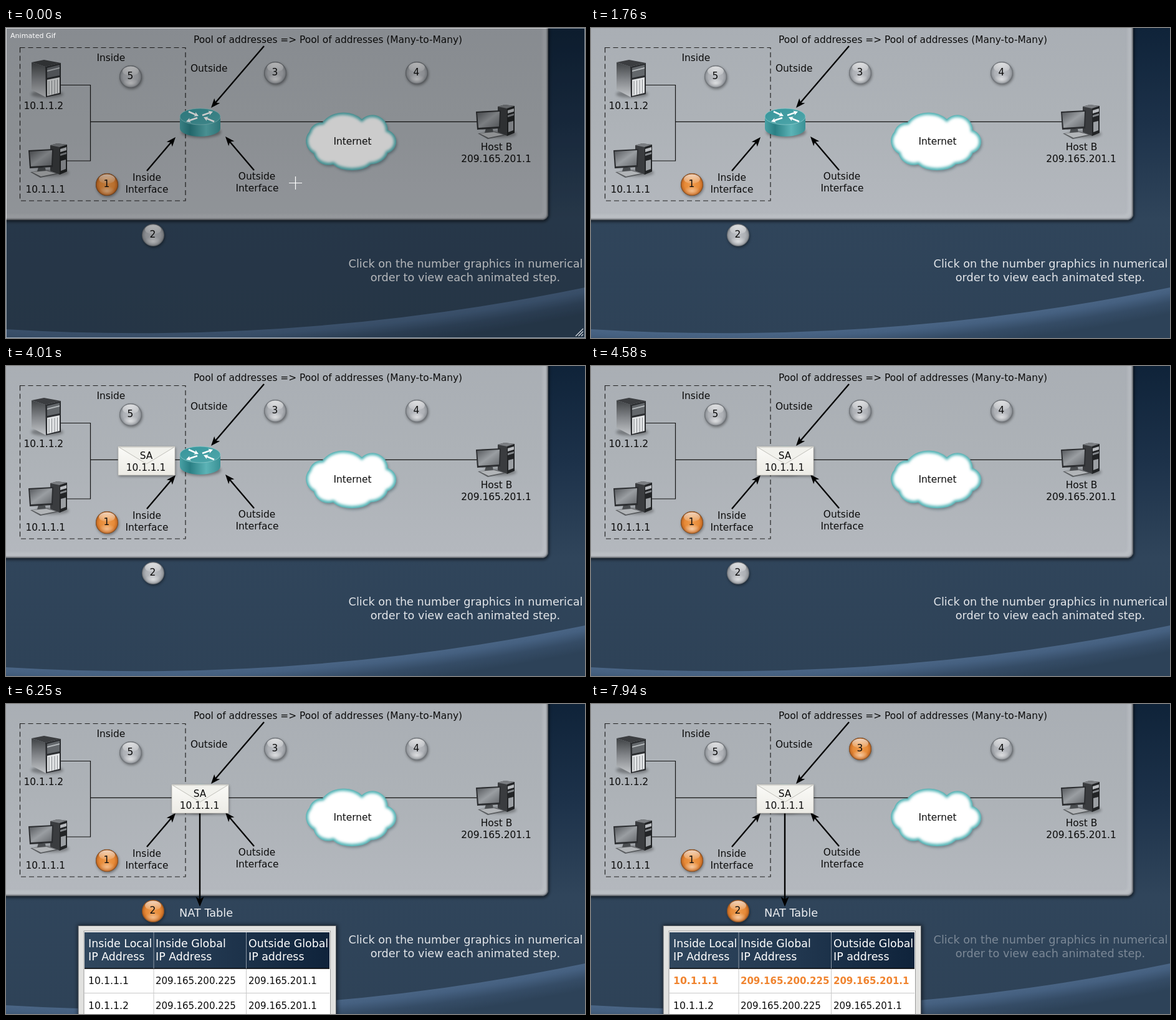
An HTML page that plays this animation: 929x497 px, repeating every 8 s.

```html
<!DOCTYPE html>
<html lang="en">
<head>
<meta charset="utf-8">
<title>NAT address pool</title>
<style>
html, body { margin: 0; width: 100%; height: 100%; overflow: hidden; background: #2f4459; }
svg { display: block; width: 929px; height: 497px; }
text { font-family: "DejaVu Sans", Verdana, sans-serif; font-size: 15.4px; fill: #0c0c0c; }
.mid { text-anchor: middle; }
.big { font-size: 17.7px; fill: #eceef1; }
.head { font-size: 17.4px; fill: #fff; }
.cell { font-size: 15px; }
.first { font-size: 15.7px; }
.hot { font-weight: bold; fill: #f0842f; }
.wire { fill: none; stroke: #151515; stroke-width: 1.2; }
</style>
</head>
<body>
<svg id="stage" viewBox="0 0 929 497" xmlns="http://www.w3.org/2000/svg"></svg>
<script>
const CLOUD = 'M508 152A40 34 0 0 1 571 147A24 24 0 0 1 612 164A20 19 0 0 1 612 200' +
  'A30 24 0 0 1 585 218A34 18 0 0 1 525 218A24 22 0 0 1 494 201A22 22 0 0 1 487 167A20 20 0 0 1 508 152Z';

const text = (x, y, s, cls = '') => `<text x="${x}" y="${y}" class="${cls}">${s}</text>`;
const mid = (x, y, s, cls = '') => text(x, y, s, 'mid ' + cls);
const poly = (points, fill, extra = '') => `<polygon points="${points}" fill="${fill}" ${extra}/>`;
const rect = (x, y, w, h, fill, extra = '') =>
  `<rect x="${x}" y="${y}" width="${w}" height="${h}" fill="${fill}" ${extra}/>`;

// stops: "offset colour [opacity]", separated by commas
const stops = list => list.split(',').map(s => {
  const [o, c, a = 1] = s.trim().split(' ');
  return `<stop offset="${o}" stop-color="${c}" stop-opacity="${a}"/>`;
}).join('');
const linear = (id, list, x2 = 0, y2 = 1) =>
  `<linearGradient id="${id}" x1="0" y1="0" x2="${x2}" y2="${y2}">${stops(list)}</linearGradient>`;
const radial = (id, list, attrs = '') => `<radialGradient id="${id}" ${attrs}>${stops(list)}</radialGradient>`;
const blur = (id, d) =>
  `<filter id="${id}" x="-30%" y="-30%" width="160%" height="160%"><feGaussianBlur stdDeviation="${d}"/></filter>`;

function arrow(x1, y1, x2, y2, color = '#000', w = 2.3, len = 15, half = 6) {
  const d = Math.hypot(x2 - x1, y2 - y1), ux = (x2 - x1) / d, uy = (y2 - y1) / d;
  const at = (back, side) => `${x2 - ux * back - uy * side},${y2 - uy * back + ux * side}`;
  return `<line x1="${x1}" y1="${y1}" x2="${x2 - ux * len * .7}" y2="${y2 - uy * len * .7}" stroke="${color}" stroke-width="${w}"/>` +
    poly([at(0, 0), at(len, half), at(len * .75, 0), at(len, -half)].join(' '), color);
}

function badge(n, x, y) {
  return `<g transform="translate(${x} ${y})">
    <circle cx="1" cy="2" r="18" fill="#000" opacity=".4" filter="url(#b2)"/>
    <circle r="18" fill="url(#grey)"/>
    <circle id="lit${n}" r="18" fill="url(#orange)"/>
    <ellipse cy="-9" rx="13" ry="7.5" fill="url(#gloss)"/>
    <ellipse id="glow${n}" cy="10" rx="13" ry="8" fill="url(#glow)"/>
    ${mid(-.5, 4, n)}</g>`;
}

function server() {
  let ribs = '';
  for (let i = 0; i < 4; i++) ribs += `<path d="M${69 + i * 4.5} ${85 - i * .8}V${107 - i * .5}" stroke="#85898d"/>`;
  return `<ellipse cx="66" cy="106" rx="26" ry="6" fill="#000" opacity=".3" filter="url(#b2)"/>` +
    poly('41,55 63,62 64,111 41,99', 'url(#side)') +
    poly('41,55 61,51 88,56 63,62', '#3b3d40') +
    poly('63,62 88,56 88,106 64,111', '#2b2d30') +
    poly('66,64 86,59 86,76 66,80', '#63676b') +
    poly('66,68 86,63 86,65 66,70', '#b4b8bb') +
    poly('66,83 86,79 86,104 66,109', '#e2e4e6') + ribs;
}

function desktop(dx, dy) {
  return `<g transform="translate(${dx} ${dy})">
    <ellipse cx="74" cy="232" rx="27" ry="6" fill="#000" opacity=".3" filter="url(#b2)"/>` +
    poly('71,188 82,185 98,187 98,230 86,235 71,229', '#3a3c3f') +
    poly('71,188 82,185 98,187 86,191', '#7b7e82') +
    poly('86,191 98,187 98,230 86,235', '#222426') +
    poly('87,194 97,191 97,196 87,199', '#b9bcc0') + poly('87,202 97,199 97,202 87,205', '#85898d') +
    poly('88,213 96,211 96,226 88,229', '#9b9fa3') +
    poly('52,223 63,224 64,230 50,230', '#4a4d50') +
    poly('36,196 76,194 75,223 38,225', '#2c2e31') +
    poly('38,198 74,196 73,220 40,222', 'url(#screen)') +
    poly('39,231 66,228 84,234 55,240', '#5a5d60') +
    poly('42,231 65,229 80,233 56,238', '#b2b5b8') +
    '</g>';
}

function router() {
  const spoke = (...p) => arrow(...p, '#fff', 2.5, 7, 3.8);
  return `<ellipse cx="313" cy="167" rx="32" ry="9" fill="#000" opacity=".35" filter="url(#b2)"/>
    <path d="M279 142V161A32.5 13 0 0 0 344 161V142Z" fill="url(#teal)"/>
    <ellipse cx="311.5" cy="142" rx="32.5" ry="13" fill="url(#tealTop)" stroke="#8cc9cb" stroke-width=".8"/>` +
    spoke(293, 134, 309, 141) + spoke(315, 140, 332, 134) +
    spoke(307, 144, 289, 150) + spoke(334, 150, 317, 143);
}

const cloud = () => `
  <path d="${CLOUD}" transform="translate(2 3)" fill="#2a4a52" opacity=".45" filter="url(#b2)"/>
  <path d="${CLOUD}" fill="#fff"/>
  <g clip-path="url(#cloudClip)"><path d="${CLOUD}" fill="none" stroke="#4fb3b5" stroke-width="6" filter="url(#b2)"/></g>
  <path d="${CLOUD}" fill="none" stroke="#62b4b6" stroke-width="1.2"/>` + mid(556, 187, 'Internet');

const envelope = () => `<g id="mail">
  ${rect(1, 2, 91, 46, '#000', 'opacity=".4" filter="url(#b2)"')}
  ${rect(0, 0, 91, 46, 'url(#paper)', 'stroke="#b9b8b2" stroke-width=".7"')}
  <path d="M1 1L45.5 28L90 1Z" fill="#f1f1ec" stroke="#c0bfb9"/>
  ${mid(45, 20, 'SA')}${mid(44.5, 39, '10.1.1.1')}</g>`;

function table() {
  const cols = [132, 240, 389];
  const row = (y, cells, cls) => cells.map((s, i) => text(cols[i], y, s, cls + (i || cls === 'head' ? '' : ' first'))).join('');
  const hit = ['10.1.1.1', '209.165.200.225', '209.165.201.1'];
  const seps = [237, 385.5].map(x =>
    `<path d="M${x} 366V424" stroke="#8c98a5"/><path d="M${x} 425V497" stroke="#c9c9c9"/>`).join('');
  return `<g id="table">${text(278, 341, 'NAT Table', 'big')}
    ${rect(115, 354, 417, 160, '#000', 'opacity=".55" filter="url(#b3)"')}
    ${rect(116, 355.5, 413.5, 160, '#e2e2e0', 'stroke="#55595e"')}
    ${rect(125, 364, 395.5, 160, '#fff', 'stroke="#9a9a9a"')}
    ${rect(126, 366, 393, 58, 'url(#navy)')}
    <path d="M126 424H519" stroke="#000" stroke-width="1.6"/>${seps}
    <path d="M126 463.5H519" stroke="#c9c9c9"/>
    ${row(390, ['Inside Local', 'Inside Global', 'Outside Global'], 'head')}
    ${row(411, ['IP Address', 'IP Address', 'IP address'], 'head')}
    <g id="hot">${row(449, hit, 'cell hot')}</g><g id="plain">${row(449, hit, 'cell')}</g>
    ${row(489, ['10.1.1.2', '209.165.200.225', '209.165.201.1'], 'cell')}</g>`;
}

const recorder = () => `<g id="recorder">
  ${rect(1, 1, 927, 495, '#000', 'opacity=".2"')}
  ${rect(.5, .5, 928, 496, 'none', 'stroke="#fff" stroke-opacity=".5"')}
  <text x="7" y="16" style="font-size:11.1px;fill:#fff">Animated Gif</text>
  <path d="M454 248.5H475M464.5 238V259" stroke="#fff" stroke-width="1.2"/>
  <path d="M914 494L926 482M918.5 494L926 486.5M923 494L926 491" stroke="#dfe3e8" stroke-width="1.1"/></g>`;

const HILL_R = 3640;
const hillStop = (depth, color) => `${(3570 + depth) / HILL_R} ${color}`;

document.getElementById('stage').innerHTML = `<defs>
  ${blur('b1', 1.2)}${blur('b2', 2)}${blur('b3', 3)}
  ${linear('sky', '0 #0f2339, .3 #1c3149, .62 #30455b, 1 #2e4257')}
  ${radial('hill', [hillStop(0, '#4a6585'), hillStop(8, '#456080'), hillStop(24, '#354c66'), hillStop(42, '#2d4258')].join(),
    `gradientUnits="userSpaceOnUse" cx="207" cy="-3081" r="${HILL_R}"`)}
  ${linear('panel', '0 #a9aeb4, .5 #adb2b7, 1 #b4b8be')}
  ${linear('side', '0 #3f4245, .45 #7d8084, 1 #c3c6c9')}
  ${linear('screen', '0 #55585c, .5 #9a9ea2, 1 #66696d', 1, 1)}
  ${linear('teal', '0 #48a0a4, .25 #2a7f84, .65 #5cb3b6, 1 #3a9195', 1, 0)}
  ${linear('tealTop', '0 #37949a, 1 #4fa7ab', 1, 1)}
  ${linear('paper', '0 #fbfbf8, 1 #ecebe5')}
  ${linear('navy', '0 #30475e, .5 #223850, 1 #0f233b', 1, 0)}
  ${radial('grey', '0 #bcbfc4, .65 #adb0b5, .88 #94989d, 1 #63676c')}
  ${radial('orange', '0 #ef9a4b, .65 #e68a38, .88 #cc7027, 1 #80481a')}
  ${linear('gloss', '0 #fff .7, 1 #fff .12')}
  ${radial('glow', '0 #fff .75, 1 #fff 0')}
  <clipPath id="cloudClip"><path d="${CLOUD}"/></clipPath>
  <clipPath id="panelClip"><rect x="-20" y="-20" width="890" height="328" rx="10"/></clipPath>
  </defs>
  ${rect(0, 0, 929, 497, 'url(#sky)')}
  <path d="M0 483A3570 3570 0 0 0 929 416V497H0Z" fill="url(#hill)"/>
  ${rect(-20, -20, 892, 331, '#000', 'rx="11" opacity=".5" filter="url(#b2)"')}
  ${rect(-20, -20, 890, 328, 'url(#panel)', 'rx="10"')}
  <g clip-path="url(#panelClip)">
    ${rect(-20, -20, 884, 322, 'none', 'rx="8" stroke="#cdd0d4" stroke-width="3" opacity=".6" filter="url(#b2)"')}
    ${rect(-20, -20, 891, 329, 'none', 'rx="10" stroke="#4a4f55" stroke-width="5" filter="url(#b1)"')}
  </g>
  ${rect(22.5, 31.5, 265.5, 245.5, 'none', 'stroke="#222" stroke-width="1.2" stroke-dasharray="8 5"')}
  <path class="wire" d="M88 91.5H135.5V213H95M135.5 150.3H758"/>
  ${server()}${desktop(0, 0)}${desktop(718, -62)}${router()}${cloud()}
  ${arrow(414, 29, 329, 128)}${arrow(226, 229, 272, 175)}${arrow(398, 228, 352, 174)}
  ${text(301, 24, 'Pool of addresses =&gt; Pool of addresses (Many-to-Many)')}
  ${text(145.5, 53, 'Inside')}${text(296, 70, 'Outside')}
  ${text(28.5, 130, '10.1.1.2')}${text(31.5, 264, '10.1.1.1')}
  ${mid(226, 245, 'Inside')}${mid(226, 263.5, 'Interface')}
  ${mid(402.5, 243, 'Outside')}${mid(403, 262, 'Interface')}
  ${mid(787, 196, 'Host B')}${mid(786.5, 215, '209.165.201.1')}
  ${badge(1, 162, 251)}${badge(2, 236, 332)}${badge(3, 432, 72)}${badge(4, 659, 72)}${badge(5, 200, 78)}
  <g id="down">${arrow(311, 175, 311, 325, '#000', 2.4, 16, 6.5)}</g>
  ${envelope()}
  <g id="hint">${mid(737.5, 384, 'Click on the number graphics in numerical', 'big')}
  ${mid(737, 406, 'order to view each animated step.', 'big')}</g>
  ${table()}${recorder()}`;

const LOOP = 8000;
const TICKS = [0, 80, 640, 1200, 1760, 2340, 2890, 3450, 4010, 4580, 5140, 5680, 6250, 6800, 7390, 7940];
const HINT = [.4, .95, .95, .55];
const GLOW = [.7, .55, .75, .45];
const ROUTE = [[26, 190], [86, 190], [96, 129], [180, 129], [266, 129]];
const FADE = [0, .22, .62, 1];
const LIT_AT = { 1: 0, 2: 5680, 3: 7940 };

const el = id => document.getElementById(id);
const show = (id, on) => el(id).setAttribute('display', on ? 'inline' : 'none');
const alpha = (id, v) => el(id).setAttribute('opacity', v);

// The picture is held between ticks.
function draw(now) {
  const t = now % LOOP;
  const step = TICKS.filter(k => k <= t).length - 1;
  const phase = (step + 1) % 4;

  show('recorder', t < 1760);
  alpha('hint', HINT[phase]);
  for (let n = 1; n <= 5; n++) {
    const on = t >= (LIT_AT[n] ?? Infinity);
    show('lit' + n, on);
    alpha('glow' + n, on ? GLOW[phase] : .75);
  }

  show('mail', step >= 5);
  const [x, y] = ROUTE[Math.min(Math.max(step - 5, 0), ROUTE.length - 1)];
  el('mail').setAttribute('transform', `translate(${x} ${y})`);

  show('down', t >= 5680);
  show('table', t >= 6250);
  const hot = FADE[Math.min(Math.max(step - 12, 0), 3)];
  alpha('hot', hot);
  alpha('plain', 1 - hot);
}

const start = performance.now();
function loop() {
  draw(performance.now() - start);
  requestAnimationFrame(loop);
}
loop();
</script>
</body>
</html>
```
